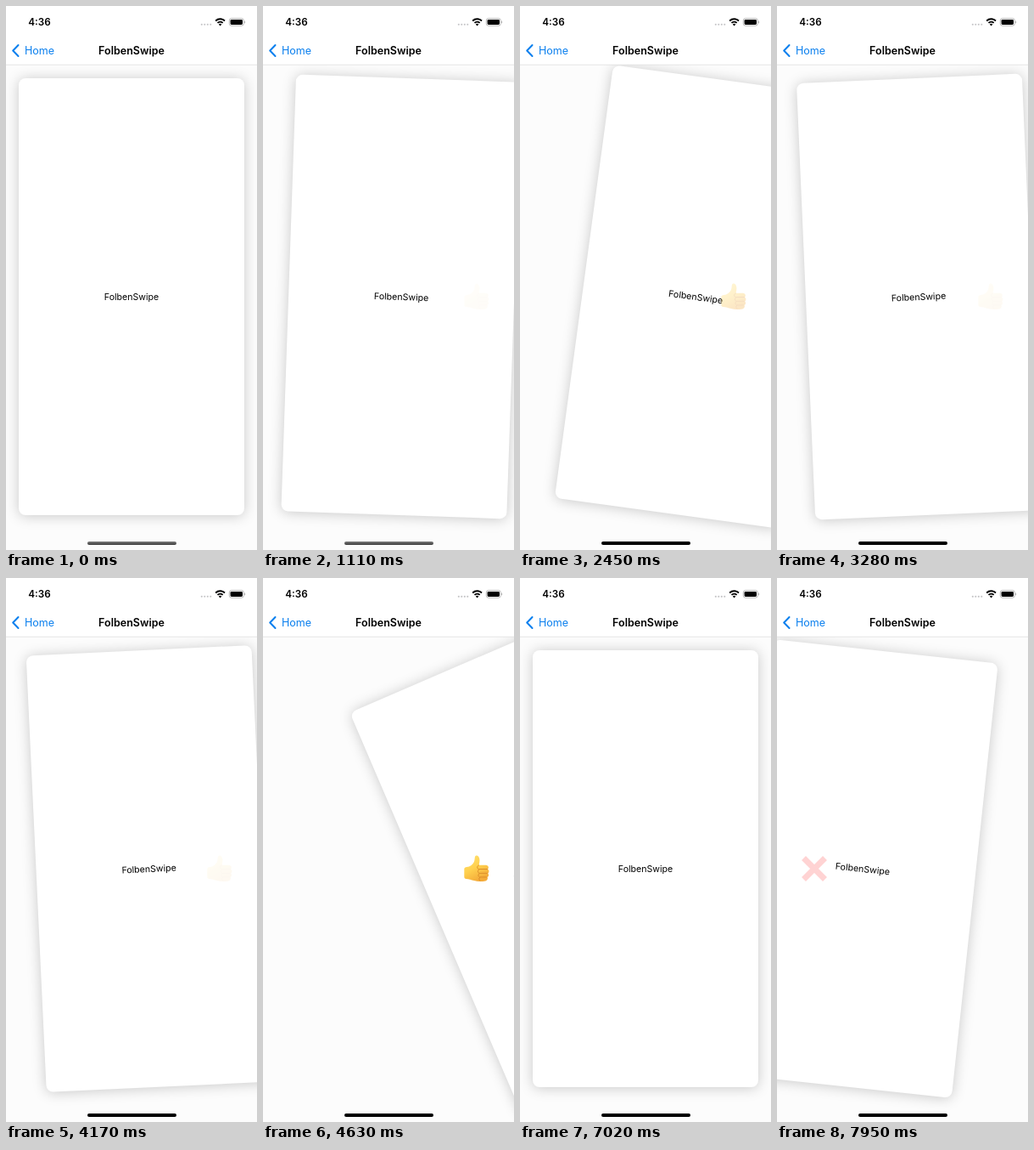
Recreate the animation shown at these times as an HTML page. Size 296 by 640 pixels, loop 8 s.

```html
<!DOCTYPE html>
<html lang="en">
<head>
<meta charset="utf-8">
<title>Swipe card</title>
<style>
  html, body { margin: 0; width: 100%; height: 100%; overflow: hidden; }
  body { position: relative; background: #fcfcfc; font-family: Inter, Roboto, sans-serif; color: #000; }
  .card {
    position: absolute; left: 15px; top: 85px; width: 266px; height: 514px;
    display: flex; align-items: center; justify-content: center;
    border-radius: 8px; background: #fff; font-size: 10.6px;
    box-shadow: 0 1px 16px rgba(0, 0, 0, .21);
  }
  svg { position: absolute; left: 0; top: 0; }
  .mark { opacity: 0; }
  .bar {
    position: absolute; left: 95.5px; top: 630px; width: 105px; height: 4px;
    border-radius: 2px; background: #000;
  }
  .bar.dim { background: linear-gradient(#808080, #383838); }
</style>
</head>
<body>
<div class="card" id="card">FolbenSwipe</div>

<svg width="296" height="640" viewBox="0 0 296 640">
  <defs>
    <linearGradient id="skin" x1="0" y1="0" x2=".5" y2="1">
      <stop offset="0" stop-color="#ffe066"/>
      <stop offset=".55" stop-color="#ffcc3d"/>
      <stop offset="1" stop-color="#f3a326"/>
    </linearGradient>
  </defs>

  <g class="mark" id="like">
    <path fill="url(#skin)" d="M237.3 342.5c0-1.6 1.2-2.2 3-2.4 3.800-.6 6.700-2.600 8.300-5.600 1-1.900 1-4.200 1.300-6.200.3-2 3-2.300 4.300-.6 1.700 2.300 1.500 6.200.3 10.100h8.300c3 0 4 3.300 2.200 4.800 1.800 1.100 1.900 3.700.3 4.800 1.300 1.400 1 3.600-.7 4.500 1 2-.2 4.100-2.300 4.500-4.300.9-9.300.9-13.400-.3-3.300-1-6.200-1.800-9.200-2.100-1.600-.2-2.400-1-2.400-2.500z"/>
    <g fill="none" stroke="#d98316" stroke-width="1" stroke-linecap="round">
      <path d="M254.400 337.900c-2.200 1.200-2.400 3.800.1 4.600h10"/>
      <path d="M255 342.800c-2.300 1.200-2 4 .2 4.500h9.200"/>
      <path d="M255.300 347.600c-2 1.100-1.700 3.700.3 4.300h7.800"/>
      <path d="M255.700 352.200c-1.400 1-1.200 2.900.2 3.800"/>
    </g>
  </g>

  <path class="mark" id="nope" d="M31.500 329.500l25 25m0-25l-25 25" stroke="#ff2b2b" stroke-width="7"/>

  <path fill="#fff" d="M0 0h296v69H0z"/>
  <path fill="#dedede" d="M0 68.700h296v.8H0z"/>

  <text x="39.500" y="22.800" font-size="11.700" font-weight="600" text-anchor="middle">4:36</text>
  <g fill="#c4c4c6">
    <circle cx="230.800" cy="21.800" r="1.050"/><circle cx="234.300" cy="21.800" r="1.050"/>
    <circle cx="237.800" cy="21.800" r="1.050"/><circle cx="241.300" cy="21.800" r="1.050"/>
  </g>
  <g fill="none" stroke="#000" stroke-width="1.900">
    <path d="M247.200 17.500a7.700 7.700 0 0 1 10.800 0"/>
    <path d="M249.500 19.900a4.500 4.500 0 0 1 6.200 0"/>
  </g>
  <path d="M252.600 23.400l-1.800-1.900a2.600 2.600 0 0 1 3.600 0z"/>
  <rect x="263.300" y="14.600" width="17" height="8.600" rx="2.500" fill="none" stroke="#a6a6a6" stroke-width=".8"/>
  <rect x="264.600" y="15.900" width="14.400" height="6" rx="1.400"/>
  <path fill="#a6a6a6" d="M281.300 17.400c1.300.4 1.300 2.600 0 3z"/>

  <path d="M14.500 46l-6.300 6.500 6.300 6.500" fill="none" stroke="#0a7fee" stroke-width="2" stroke-linecap="round" stroke-linejoin="round"/>
  <text x="22" y="57" font-size="12.500" fill="#0a7fee">Home</text>
  <text x="148" y="57" font-size="12.500" font-weight="600" text-anchor="middle">FolbenSwipe</text>
</svg>

<div class="bar" id="bar"></div>

<script>
  const LOOP = 8000;
  const TILT = 0.1305;   // degrees per pixel dragged
  const MAX_TILT = 25;

  const linear = p => p;
  const smooth = p => p * p * (3 - 2 * p);
  const pull = p => p ** 1.34;
  const settle = p => 1 - (1 - p) ** 3;

  // grip: 1 = held above the middle, -1 = held below it, 0 = no tilt
  const moves = [
    { at: 1110, steps: 4, from: 0, to: 97, grip: 1, ease: smooth },
    { at: 1600, steps: 3, from: 97, to: 0, grip: 1, ease: smooth },
    { at: 2330, steps: 3, from: 0, to: 80, grip: 1, ease: smooth },
    { at: 2730, steps: 3, from: 80, to: 0, grip: 1, ease: smooth },
    { at: 3280, steps: 3, from: 0, to: 57, grip: -1, ease: linear },
    { at: 3620, steps: 3, from: 57, to: 0, grip: -1, ease: smooth },
    { at: 4170, steps: 5, from: 0, to: 178, grip: -1, ease: pull },
    { at: 4930, steps: 3, from: 178, to: 480, grip: -1, ease: linear },
    { at: 6690, steps: 4, from: -60, to: 0, grip: 0, ease: settle },
    { at: 7730, steps: 3, from: 0, to: -47, grip: -1, ease: linear }
  ];
  const STEP = 110;

  const [card, like, nope, bar] =
    ['card', 'like', 'nope', 'bar'].map(id => document.getElementById(id));
  const clamp = (v, lo, hi) => Math.min(hi, Math.max(lo, v));
  const fade = x => clamp((x - 10) / 185, 0, 1);

  function pose(t) {
    const m = moves.filter(m => t >= m.at).pop();
    if (!m) return { x: 0, tilt: 0 };
    const k = Math.min(m.steps, Math.floor((t - m.at) / STEP) + 1);
    const x = m.from + (m.to - m.from) * m.ease(k / m.steps);
    return { x, tilt: clamp(m.grip * x * TILT, -MAX_TILT, MAX_TILT) };
  }

  function draw(now) {
    const t = now % LOOP;
    const { x, tilt } = pose(t);
    card.style.transform = `translateX(${x}px) rotate(${tilt}deg)`;
    like.style.opacity = fade(x);
    nope.style.opacity = fade(-x);
    bar.classList.toggle('dim', t < 2330);
  }

  const start = performance.now();
  function tick() {
    draw(performance.now() - start);
    requestAnimationFrame(tick);
  }
  tick();
</script>
</body>
</html>
```
